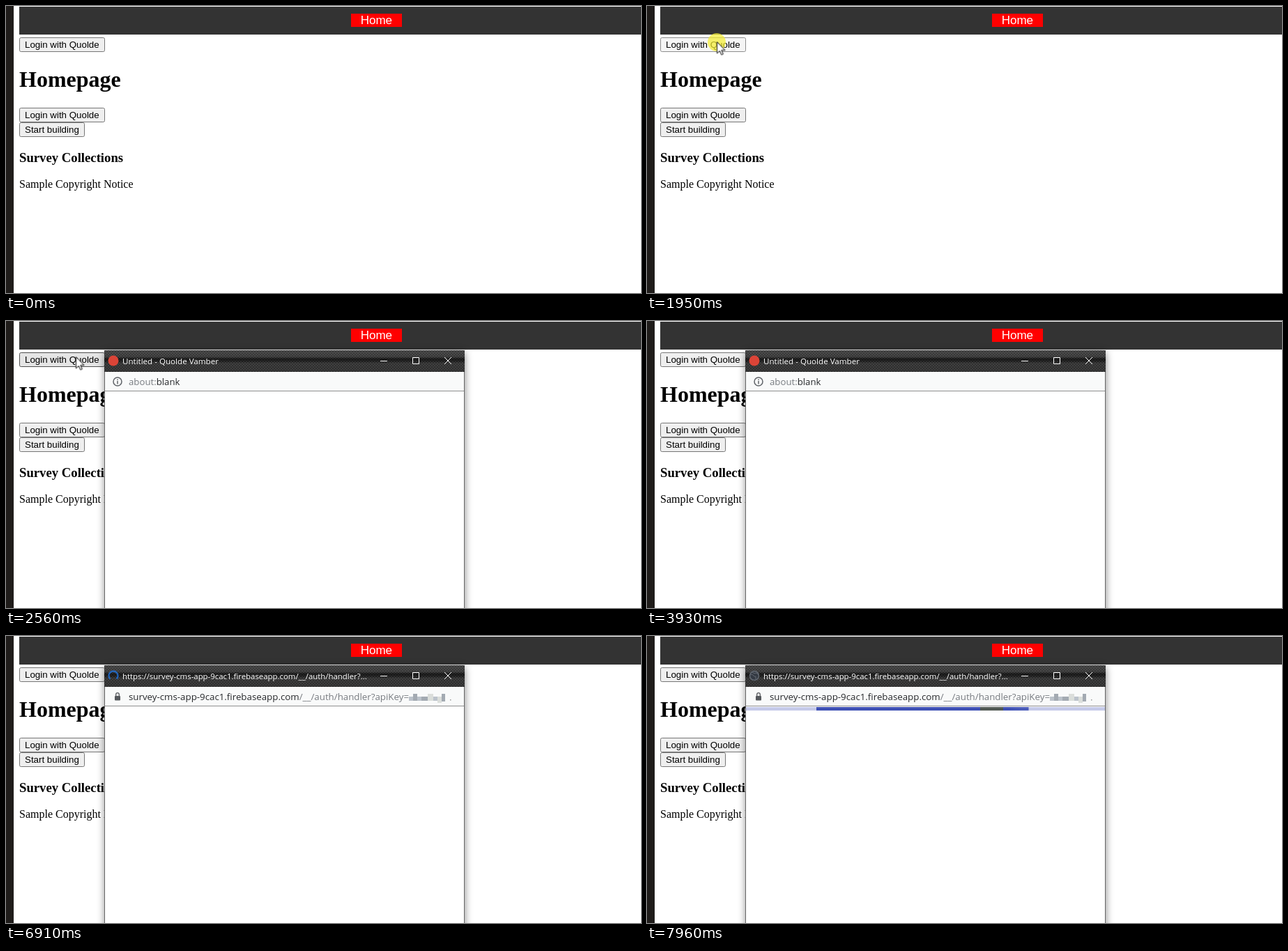
Recreate the animation shown at these times as an HTML page. Size 911 by 412 pixels, loop 8 s.

```html
<!DOCTYPE html>
<html lang="en">
<head>
<meta charset="utf-8">
<title>Login popup</title>
<style>
  html, body { margin: 0; width: 100%; height: 100%; overflow: hidden; background: #fff; }
  svg { display: block; width: 100vw; height: 100vh; }
  text { white-space: pre; }

  .serif { font-family: "Liberation Serif", "Times New Roman", serif; }
  .arial { font-family: "Liberation Sans", Arial, sans-serif; }
  .ui { font-family: "Open Sans", "Noto Sans", sans-serif; }
  .bold { font-weight: bold; }
  .btn rect { fill: #efefef; stroke: #767676; }
  .btn text { font-size: 13.333px; }
  .dim { fill: #777b80; }

  /* Everything runs on one 8 s clock; toggles change hard. */
  .cursor, .halo, .login rect, .popup, .icon, .spin, .arc, .globe, .blank, .url, .load, .bar, .seam {
    animation: 8s step-end infinite;
  }
  .cursor { animation-name: cursor; }
  .halo { animation-name: halo; animation-timing-function: linear; }
  .login rect { animation-name: press; }
  .popup { animation-name: open; transform-origin: 399.5px 420px; }
  .icon { animation-name: icon; }
  .spin { animation-name: spin; }
  .arc { animation-name: turn; transform-origin: 154px 57px; }
  .globe { animation-name: globe; }
  .blank { animation-name: blank; }
  .url { animation-name: url; }
  .load { animation-name: load; }
  .bar { animation-name: bar; }
  .seam { animation-name: seam; }

  @keyframes cursor {
    0% { opacity: 0; transform: translate(297px, 350px); }
    10.875% { opacity: 1; transform: translate(297px, 350px); animation-timing-function: cubic-bezier(.35, .1, .3, 1); }
    20.5% { opacity: 1; transform: translate(100.5px, 51.5px); }
    43.3% { opacity: 1; transform: translate(100.5px, 51.5px); animation-timing-function: cubic-bezier(.4, .1, .7, .9); }
    49% { opacity: 1; transform: translate(301px, 413px); }
    49.1%, 100% { opacity: 0; transform: translate(301px, 413px); }
  }
  @keyframes halo {
    0%, 21.3% { opacity: 0; }
    22.25%, 24.3% { opacity: .75; }
    26%, 100% { opacity: 0; }
  }
  @keyframes press {
    0% { fill: #efefef; stroke: #767676; }
    18% { fill: #e5e5e5; stroke: #4f4f4f; }
    22.25% { fill: #f5f5f5; stroke: #8d8d8d; }
    25.125% { fill: #e5e5e5; stroke: #4f4f4f; }
    44.875%, 100% { fill: #efefef; stroke: #767676; }
  }
  @keyframes open {
    0% { opacity: 0; transform: scale(.94); }
    28.5% { opacity: .2; transform: scale(.945); }
    29.375% { opacity: .55; transform: scale(.977); }
    30.375% { opacity: .83; transform: scale(.992); }
    31.25% { opacity: .96; transform: scale(.998); }
    32%, 100% { opacity: 1; transform: none; }
  }
  @keyframes icon { 0% { opacity: 1; } 72.25%, 100% { opacity: 0; } }
  @keyframes spin { 0% { opacity: 0; } 72.25% { opacity: 1; } 91.625%, 100% { opacity: 0; } }
  @keyframes turn {
    0% { transform: rotate(0deg); }
    72.25% { transform: rotate(0deg); animation-timing-function: steps(22); }
    91.625%, 100% { transform: rotate(679deg); }
  }
  @keyframes globe { 0% { opacity: 0; } 91.625%, 100% { opacity: 1; } }
  @keyframes blank { 0% { opacity: 1; } 78.625%, 100% { opacity: 0; } }
  @keyframes url { 0% { opacity: 0; } 78.625%, 100% { opacity: 1; } }
  @keyframes load { 0% { opacity: 0; } 89.875%, 100% { opacity: 1; } }
  /* The bar is three times as wide as its distance from the left edge. */
  @keyframes bar {
    0% { transform: translateX(141.5px) scaleX(1.8); }
    89.875% { transform: translateX(141.5px) scaleX(1.8); animation-timing-function: steps(11); }
    99.5%, 100% { transform: translateX(141.5px) scaleX(101.5); }
  }
  @keyframes seam { 0% { opacity: 0; } 98.625%, 100% { opacity: 1; } }
</style>
</head>
<body>
<svg viewBox="0 0 911 412" preserveAspectRatio="none">
  <defs>
    <linearGradient id="metal" x2="0" y2="1">
      <stop offset="0" stop-color="#4a4a4a"/>
      <stop offset=".3" stop-color="#404040"/>
      <stop offset=".4" stop-color="#191919"/>
      <stop offset=".5" stop-color="#202020"/>
      <stop offset=".6" stop-color="#3a3a3a"/>
      <stop offset="1" stop-color="#363636"/>
    </linearGradient>
    <pattern id="weave" width="4" height="4" patternUnits="userSpaceOnUse">
      <path d="M0 0h2v1h-2zM2 2h2v1h-2z" fill="#000" opacity=".35"/>
      <path d="M0 1h2v1h-2zM2 3h2v1h-2z" fill="#fff" opacity=".07"/>
    </pattern>
    <filter id="blur" x="-10%" y="-10%" width="120%" height="120%">
      <feGaussianBlur stdDeviation="6"/>
    </filter>
  </defs>

  <rect width="911" height="412" fill="#fff"/>
  <rect width="11" height="412" fill="#1f1c1a"/>

  <g class="page">
    <rect x="19" y="1" width="892" height="40" fill="#333"/>
    <rect x="495" y="11" width="73" height="19" fill="#f00"/>
    <text class="arial" x="508.7" y="26" font-size="17" fill="#fff">Home</text>

    <g class="btn login arial">
      <rect x="19.5" y="45.5" width="122" height="20" rx="2"/>
      <text x="27" y="60">Login with Quolde</text>
    </g>
    <text class="serif bold" x="19" y="116" font-size="32">Homepage</text>
    <g class="btn arial">
      <rect x="19.5" y="146.5" width="122" height="20" rx="2"/>
      <text x="27" y="161">Login with Quolde</text>
      <rect x="19.5" y="167.5" width="93" height="20" rx="2"/>
      <text x="27" y="182">Start building</text>
    </g>
    <text class="serif bold" x="19" y="224" font-size="18.72">Survey Collections</text>
    <text class="serif" x="19" y="261" font-size="16">Sample Copyright Notice</text>
  </g>

  <g class="popup">
    <rect x="142" y="45" width="516" height="754" opacity=".5" filter="url(#blur)"/>
    <rect x="141.5" y="42.5" width="516" height="756" fill="#fff" stroke="#666"/>
    <rect x="141" y="42" width="517" height="31" fill="url(#metal)"/>
    <rect x="141" y="42" width="517" height="31" fill="url(#weave)"/>
    <rect x="142" y="73" width="515" height="27" fill="#f9fafa"/>
    <rect x="142" y="100" width="515" height="1" fill="#8f8f8f"/>
    <path d="M537 57.5h10M583.5 52.5h9v9h-9zM629 52l10 10M639 52l-10 10" fill="none" stroke="#fff"/>

    <circle class="icon" cx="154" cy="57" r="7.5" fill="#db4437"/>
    <g class="spin">
      <circle class="arc" cx="154" cy="57" r="6.5" fill="none" stroke="#1f6fd6" stroke-width="2" pathLength="360" stroke-dasharray="270 90"/>
    </g>
    <g class="globe" fill="none" stroke="#626871">
      <circle cx="154" cy="57" r="6.5" fill="#343a43" stroke-width="1.5"/>
      <path d="M148 55q4 0 5 2t3 1v4M151 52q3 3 6 1l3 3"/>
    </g>

    <g class="blank ui">
      <text x="167" y="62" font-size="11.6" fill="#fff">Untitled - Quolde Vamber</text>
      <circle cx="160" cy="87" r="6" fill="none" stroke="#5f6368" stroke-width="1.5"/>
      <path d="M160 83.5v1.5M160 86v4.5" stroke="#5f6368" stroke-width="1.5"/>
      <text x="176" y="92" font-size="13.2" fill="#26282b"><tspan class="dim">about:</tspan>blank</text>
    </g>

    <g class="url ui">
      <text x="167" y="62" font-size="11.4" fill="#fff">https://survey-cms-app-9cac1.firebaseapp.com/__/auth/handler?...</text>
      <rect x="156" y="86" width="8" height="6.5" rx="1" fill="#55585c"/>
      <path d="M157.7 86v-2a2.3 2.3 0 0 1 4.6 0v2" fill="none" stroke="#55585c" stroke-width="1.3"/>
      <text x="176" y="92" font-size="13.3" fill="#26282b">survey-cms-app-9cac1.firebaseapp.com<tspan class="dim">/__/auth/handler?apiKey=</tspan></text>
      <path d="M578 87h6v6h-6zM590 87h6v6h-6zM613 87h6v6h-6z" fill="#bcc3cb"/>
      <path d="M584 83h6v10h-6zM596 87h9v6h-9zM625 83h5v11h-5z" fill="#a3aab2"/>
      <path d="M605 83h8v10h-8zM619 87h6v9h-6z" fill="#dbdedb"/>
      <rect x="637" y="91" width="1.5" height="1.5" fill="#999"/>
    </g>

    <g class="load">
      <rect x="142" y="102" width="515" height="5" fill="#c5cae9"/>
      <rect class="bar" x="1" y="102" width="2.98" height="5" fill="#3f51b5"/>
      <rect class="seam" x="478" y="102" width="33" height="5" fill="#525a55"/>
    </g>
  </g>

  <circle class="halo" cx="100" cy="52" r="13" fill="#f5ee32"/>
  <path class="cursor" d="M0 0V16.5L3.8 13L6.3 18.6L8.8 17.5L6.4 12H11.5Z" fill="#fff" stroke="#000"/>
</svg>
</body>
</html>
```
